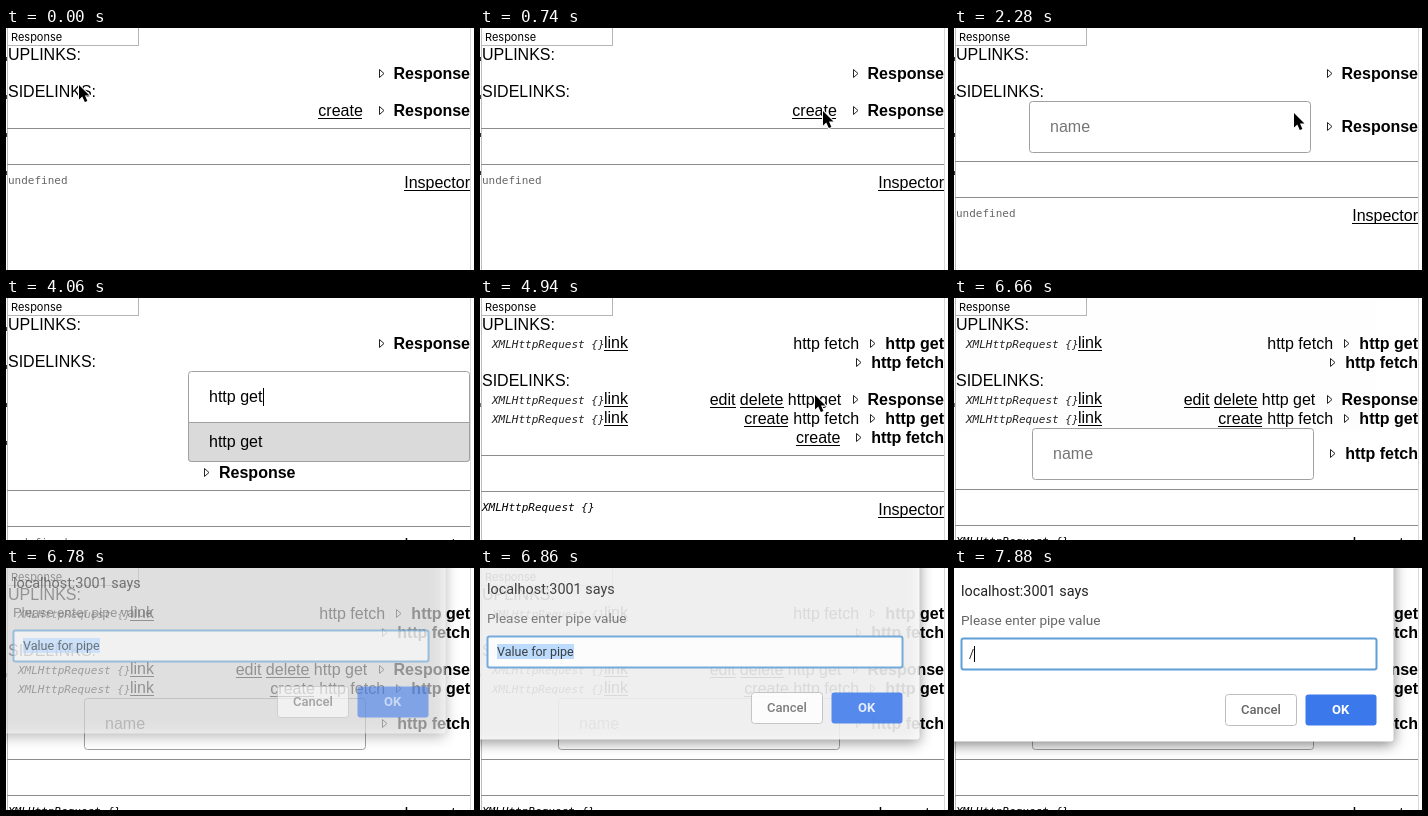
An HTML page with a canvas that plays this animation: 468x242 px, repeating every 8000 ms.

```html
<!DOCTYPE html>
<html lang="en">
<head>
<meta charset="utf-8">
<style>
html, body { margin: 0; width: 468px; height: 242px; overflow: hidden; background: #fff; }
canvas { display: block; }
</style>
</head>
<body>
<canvas id="stage" width="468" height="242"></canvas>
<script>
const ctx = document.getElementById('stage').getContext('2d');
const LOOP = 8000, RIGHT = 464;
const SANS = '16px "Liberation Sans", Arial, sans-serif';
const BOLD = 'bold ' + SANS;
const MONO = '11px "DejaVu Sans Mono", monospace';
const roboto = (size, weight = 400) => `${weight} ${size}px Roboto, sans-serif`;

function rect(x, y, w, h, color) {
  ctx.fillStyle = color;
  ctx.fillRect(x, y, w, h);
}

function box(x, y, w, h, radius, fill, stroke, line = 1) {
  ctx.beginPath();
  ctx.roundRect(x + .5, y + .5, w - 1, h - 1, radius);
  ctx.fillStyle = fill;
  ctx.fill();
  if (!stroke) return;
  ctx.strokeStyle = stroke;
  ctx.lineWidth = line;
  ctx.stroke();
}

// Returns the width of the drawn text.
function text(str, x, y, font = SANS, color = '#000') {
  ctx.font = font;
  ctx.fillStyle = color;
  ctx.fillText(str, x, y);
  return ctx.measureText(str).width;
}

function textTo(str, right, y, font = SANS) {
  ctx.font = font;
  const x = right - ctx.measureText(str).width;
  text(str, x, y, font);
  return x;
}

function linkTo(str, right, y) {
  const x = textTo(str, right, y);
  rect(Math.round(x), y + 2, Math.round(right - x), 1, '#000');
  return x;
}

function triangle(x, y) {
  ctx.beginPath();
  ctx.moveTo(x + .5, y - 9.5);
  ctx.lineTo(x + 5, y - 5.5);
  ctx.lineTo(x + .5, y - 1.5);
  ctx.closePath();
  ctx.strokeStyle = '#222';
  ctx.lineWidth = 1;
  ctx.stroke();
}

function row(y, target, { source = '', links = [], value = false } = {}) {
  let x = textTo(target, RIGHT, y, BOLD);
  triangle(Math.round(x - 15), y);
  x = textTo(source, x - 26.3, y) - 4.4;
  for (const name of links) x = linkTo(name, x, y) - 4.4;
  if (value) {
    text('XMLHttpRequest {}', 12, y - 1, 'italic ' + MONO, '#222');
    linkTo('link', 148, y - 1);
  }
}

function nameField(x, y) {
  box(x, y, 282, 52, 3, '#fff', '#a0a0a0');
  text('name', x + 21, y + 31, SANS, '#757575');
}

// Two rules with the inspected value below them.
function inspector(y, ready) {
  rect(1, y, 463, 1, '#8c8c8c');
  rect(1, y + 36, 463, 1, '#8c8c8c');
  if (ready) text('XMLHttpRequest {}', 2, y + 56, 'italic ' + MONO);
  else text('undefined', 2, y + 56, MONO, '#666');
  linkTo('Inspector', RIGHT, y + 60);
}

function frame() {
  rect(0, 0, 468, 242, '#fff');
  rect(1, 0, 1, 242, '#bdbdbd');
  rect(464, 0, 1, 242, '#d8d8d8');
  rect(1, 17, 132, 1, '#b5b5b5');
  rect(132, 0, 1, 18, '#b5b5b5');
  text('Response', 5, 13, '11px Inter, sans-serif');
  text('UPLINKS:', 2, 32);
}

function typedText(t) {
  if (t >= 4060) return 'http get';
  return 'http'.slice(0, 1 + [3280, 3420, 3560].filter(at => t >= at).length);
}

function responsePage(t) {
  for (const y of [29, 67, 105, 143]) rect(0, y, 1, 4, '#333');
  row(51, 'Response');
  text('SIDELINKS:', 2, 69);
  if (t < 1680) {
    row(88, 'Response', { links: ['create'] });
    inspector(100);
  } else if (t < 2900) {
    row(104, 'Response');
    nameField(75, 73);
    inspector(133);
  } else {
    box(182, 73, 282, 91, 3, '#fff', '#a0a0a0');
    box(182, 124, 282, 40, [0, 0, 3, 3], t < 4060 ? '#fff' : '#dadada', '#a0a0a0');
    const w = text(typedText(t), 203, 104);
    rect(Math.round(204 + w), 90, 1, 18, '#000');
    text('http get', 203, 149);
    triangle(198, 180);
    text('Response', 213, 180, BOLD);
    inspector(192);
  }
}

function fetchPage(t) {
  const editing = t >= 5800;
  rect(0, 105, 1, 4, '#777');
  row(51, 'http get', { source: 'http fetch', value: true });
  row(70, 'http fetch');
  text('SIDELINKS:', 2, 88);
  row(107, 'Response', { source: 'http get', links: ['delete', 'edit'], value: true });
  row(126, 'http get', { source: 'http fetch', links: ['create'], value: true });
  if (editing) {
    row(161, 'http fetch');
    nameField(78, 130);
    if (t < 6380) rect(99, 147, 1, 18, '#000');
  } else {
    row(145, 'http fetch', { links: ['create'] });
  }
  inspector(editing ? 191 : 157, true);
}

function dialog(t) {
  const left = 1 - Math.min(1, (t - 6660) / 280);
  ctx.save();
  ctx.globalAlpha = 1 - left ** 1.5;
  ctx.translate(0, -Math.round(25 * left * left));
  ctx.shadowColor = 'rgba(0,0,0,.5)';
  ctx.shadowBlur = 14;
  ctx.shadowOffsetY = 3;
  box(-20, -20, 460, 194, 3, '#fff');
  ctx.shadowColor = 'transparent';

  text('localhost:3001 says', 7, 28, roboto(14.4), '#222');
  text('Please enter pipe value', 7, 57, roboto(13.6), '#666');
  box(7, 70, 416, 32, 2, '#fff', '#5e9ed6', 2);
  if (t < 7820) {
    rect(17, 78, 77, 15, '#b3d7fe');
    text('Value for pipe', 17, 90, roboto(12.5), '#222');
  } else {
    text('/', 15, 90, roboto(12.5), '#222');
    rect(20, 78, 1, 16, '#000');
  }
  box(271, 126, 72, 32, 3, '#fff', '#bdbdbd');
  text('Cancel', 287, 146, roboto(13, 500), '#666');
  box(351, 126, 72, 32, 3, '#3b78ec');
  text('OK', 378, 146, roboto(13, 700), '#fff');
  ctx.restore();
}

const arrowShape = new Path2D('M0 0V14.5L3.3 11.4L5.8 17L8.4 15.9L6 10.4H10.5Z');
const beamShape = new Path2D('M-3 -7Q0 -7 0 -5V5Q0 7 -3 7M3 -7Q0 -7 0 -5M0 5Q0 7 3 7M-2 2H2');

// Each stop: time, x, y.
const toCreate = [[0, 73, 57], [250, 150, 98], [500, 270, 104], [740, 343, 83], [820, 348, 82],
  [1050, 361, 86], [1280, 350, 88], [1500, 340, 85]];
const toLowerCreate = [[4880, 340, 85], [5100, 322, 130], [5320, 312, 166], [5520, 326, 150], [5680, 333, 140]];

function along(stops, t) {
  const i = stops.findIndex(stop => stop[0] > t);
  if (i < 0) return stops.at(-1).slice(1);
  const [t0, x0, y0] = stops[i - 1], [t1, x1, y1] = stops[i];
  const p = (t - t0) / (t1 - t0);
  return [x0 + (x1 - x0) * p, y0 + (y1 - y0) * p];
}

function cursor(t) {
  const first = t < 2900;
  if (!first && (t < 4880 || t >= 5800)) return;
  const [x, y] = along(first ? toCreate : toLowerCreate, t);
  ctx.save();
  ctx.translate(Math.round(x), Math.round(y));
  if (first || t < 5060) {
    ctx.lineWidth = 2;
    ctx.strokeStyle = '#fff';
    ctx.stroke(arrowShape);
    ctx.fillStyle = '#000';
    ctx.fill(arrowShape);
  } else {
    ctx.translate(.5, .5);
    ctx.lineWidth = 1;
    ctx.strokeStyle = '#111';
    ctx.stroke(beamShape);
  }
  ctx.restore();
}

function draw() {
  const t = performance.now() % LOOP;
  frame();
  if (t < 4280) responsePage(t);
  else fetchPage(t);
  cursor(t);
  if (t >= 6660) dialog(t);
  requestAnimationFrame(draw);
}
draw();
</script>
</body>
</html>
```
